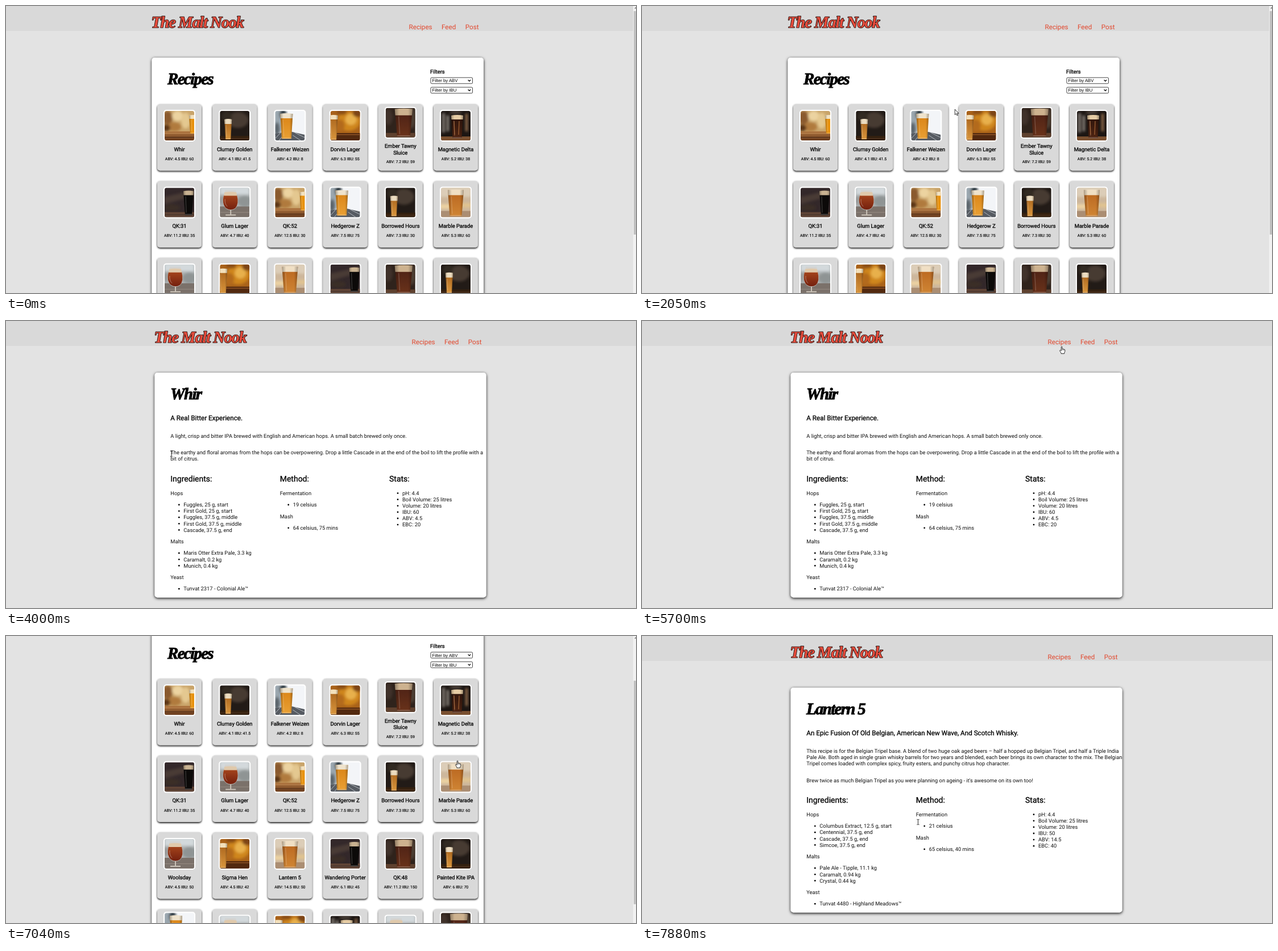
An HTML page for the animation above (8000 ms loop, 1108x506 px).

```html
<!DOCTYPE html>
<html lang="en">
<head>
<meta charset="utf-8">
<title>Recipes</title>
<style>
html, body { margin: 0; width: 100%; height: 100%; overflow: hidden; background: #e3e3e3; }
svg { display: block; width: 1108px; height: 506px; }
text { font-family: Roboto, sans-serif; font-size: 9.34px; fill: #111; text-rendering: geometricPrecision; white-space: pre; }
.script { font: italic bold 29px "Liberation Serif", serif; letter-spacing: -1.7px; fill: #000; stroke: #000; stroke-width: .9; }
.brand { font-size: 28.5px; letter-spacing: -1.3px; fill: #e74c3c; stroke: #1c1210; stroke-width: 1.7; paint-order: stroke; stroke-linejoin: round; }
.nav { font-size: 11.68px; fill: #e2492f; }
.strong { fill: #000; stroke: #000; stroke-width: .3; }
.tag { font-size: 11.68px; }
.head { font-size: 14px; }
.mid { text-anchor: middle; }
.abv { font-size: 7px; stroke-width: .15; }
.opt { font: 7.78px "Liberation Sans", sans-serif; fill: #000; }
</style>
</head>
<body>
<svg id="stage" viewBox="0 0 1108 506"></svg>
<script>
const stage = document.getElementById('stage');
const LOOP = 8000, LINE = 11.1;

const text = (x, y, s, cls = '') => `<text x="${x}" y="${y}" class="${cls}">${s}</text>`;
const rect = (x, y, w, h, fill, r = 0, more = '') =>
  `<rect x="${x}" y="${y}" width="${w}" height="${h}" rx="${r}" fill="${fill}" ${more}/>`;
const blob = (x, y, rx, ry, fill, o = 1) =>
  `<ellipse cx="${x}" cy="${y}" rx="${rx}" ry="${ry}" fill="${fill}" opacity="${o}"/>`;
const soft = s => `<g filter="url(#blur)">${s}</g>`;
const gradient = (id, a, b) =>
  `<linearGradient id="${id}" x2="0" y2="1"><stop stop-color="${a}"/><stop offset="1" stop-color="${b}"/></linearGradient>`;

// Tapered glass with a foam head, shaded sides and a highlight.
function glass(x, y, w, h, beer, foam, head, taper = 2.5) {
  const k = taper * head / h, r = x + w, b = y + h;
  const body = `<path d="M${x} ${y}H${r}L${r - taper} ${b}H${x + taper}Z" `;
  return body + `fill="${beer}"/>` +
    `<path d="M${x} ${y}Q${x + w / 2} ${y - 2} ${r} ${y}L${r - k} ${y + head}H${x + k}Z" fill="${foam}"/>` +
    body + 'fill="url(#sides)"/>' +
    `<path d="M${x + w * .22} ${y + head + 2}L${x + w * .28} ${b - 4}" stroke="#fff" stroke-width="1.2" opacity=".2"/>` +
    `<path d="M${x + taper} ${b - 1}H${r - taper}" stroke="#fff" stroke-width="1.5" opacity=".25"/>`;
}

const photos = {
  bar: rect(0, 0, 52, 52, '#c9a46a') +
    soft(blob(5, 12, 9, 12, '#8a5a2e') + blob(23, 9, 10, 9, '#ecd3a0') + blob(17, 28, 12, 8, '#b07a3e') +
      blob(37, 17, 8, 14, '#e4c890') + blob(3, 30, 7, 6, '#5c3619')) +
    rect(0, 36, 52, 16, 'url(#wood)') + rect(0, 39, 52, 1, '#c08a55') + rect(0, 46, 52, 1, '#4a2a16') +
    glass(43, 8, 16, 32, '#e8920f', '#f3e2c0', 6, 2),
  dim: rect(0, 0, 52, 52, '#221b17') +
    soft(blob(32, 16, 18, 14, '#463a32') + blob(12, 10, 9, 9, '#332a24')) +
    rect(0, 44, 52, 8, '#33200f') + rect(0, 48, 52, 1, '#553520') +
    glass(8, 15, 13, 35, 'url(#amber)', '#ecdcc0', 8, 2),
  light: rect(0, 0, 52, 52, '#f3f5f8') +
    soft(rect(-2, -2, 14, 40, '#9aa6ae') + blob(14, 6, 6, 9, '#333d45') + blob(3, 32, 5, 12, '#5a636a')) +
    '<path d="M0 40L26 36L52 42V52H0Z" fill="#565b62"/><path d="M-3 52L9 39M6 53L18 38M34 38L52 47M31 43L46 53" stroke="#b4b9be" stroke-width="1"/>' +
    glass(9, 5, 22, 44, 'url(#orange)', '#efe3cc', 8),
  gold: rect(0, 0, 52, 52, '#a9621a') +
    soft(blob(32, 18, 20, 17, '#cf861f') + blob(36, 15, 10, 10, '#e8b04c') + blob(17, 26, 8, 11, '#b36a1a') + blob(48, 4, 9, 7, '#7d4412') + blob(20, 2, 9, 5, '#8a4e14')) +
    rect(0, 39, 52, 13, '#52290f') + rect(0, 41, 52, 1.5, '#8f5527') +
    glass(-3, 8, 16, 43, 'url(#amber)', '#f3e0bb', 7, 2.5),
  brown: rect(0, 0, 52, 52, '#2f231c') +
    soft(blob(45, 18, 8, 18, '#4c3c32') + blob(5, 16, 7, 14, '#41322a')) +
    rect(0, 44, 52, 8, '#5e412f') +
    glass(16, 2, 31, 48, 'url(#ruby)', '#cdb28f', 11, 4),
  night: rect(0, 0, 52, 52, '#1c1613') +
    soft(rect(2, 4, 5, 34, '#7d766f') + rect(10, 8, 4, 28, '#8d8780') + rect(43, 5, 4, 31, '#96704d') + blob(26, 3, 11, 3, '#4d433b')) +
    rect(0, 45, 52, 7, '#7a5030') +
    glass(18, 8, 21, 40, 'url(#dark)', '#e6cca4', 7) +
    '<path d="M23 18L24 42M32 18L31 42" stroke="#b8743f" stroke-width="1.4" opacity=".7"/>',
  stout: rect(0, 0, 52, 52, '#33282a') +
    soft('<path d="M0 16L52 4V14L0 29Z" fill="#493b36"/>' + blob(13, 35, 14, 6, '#3a2d28')) +
    rect(0, 43, 52, 9, '#5f4436') + rect(0, 47, 52, 1, '#42302a') +
    glass(33, 6, 18, 42, '#0c0a09', '#c9b291', 7, 3),
  tulip: rect(0, 0, 52, 52, '#aeb3b4') +
    soft(rect(0, -2, 52, 14, '#d3d9dc') + blob(44, 24, 13, 10, '#8f9494') + blob(4, 22, 7, 8, '#9b9d9c')) +
    rect(0, 33, 52, 19, '#7b716a') + rect(0, 43, 52, 1, '#978c83') +
    '<path d="M9 4Q8 9 6 17Q3 30 11 37Q19 42 27 37Q34 30 31 17Q29 9 28 4Z" fill="#d5d2cc" opacity=".65"/>' +
    '<path d="M7 13H30Q34 29 27 36Q19 41 11 36Q3 29 7 13Z" fill="url(#red)"/>' +
    '<path d="M8 8Q18 6 29 8L30 14H7Z" fill="#e0c9ab"/>' +
    '<path d="M19 39V47M10 48H28" stroke="#cbc3b8" stroke-width="2"/><path d="M9 20Q8 28 13 33" fill="none" stroke="#fff" opacity=".35"/>',
  beige: rect(0, 0, 52, 52, '#cdb79c') +
    soft(rect(-2, -2, 56, 18, '#dccdb8') + rect(-2, 29, 20, 8, '#ecd2a2') + rect(36, 27, 18, 8, '#dfc391')) +
    rect(0, 41, 52, 11, '#ab8e73') +
    glass(12, 4, 28, 46, 'url(#copper)', '#f0dfc4', 9, 3.5)
};

// photo, name, ABV, IBU
const beers = [
  ['bar', 'Whir', 4.5, 60], ['dim', 'Clumsy Golden', 4.1, 41.5], ['light', 'Falkener Weizen', 4.2, 8],
  ['gold', 'Dorvin Lager', 6.3, 55], ['brown', 'Ember Tawny|Sluice', 7.2, 59], ['night', 'Magnetic Delta', 5.2, 38],
  ['stout', 'QK:31', 11.2, 35], ['tulip', 'Glum Lager', 4.7, 40], ['bar', 'QK:52', 12.5, 30],
  ['light', 'Hedgerow Z', 7.5, 75], ['dim', 'Borrowed Hours', 7.3, 30], ['beige', 'Marble Parade', 5.3, 60],
  ['tulip', 'Woolsday', 4.5, 50], ['gold', 'Sigma Hen', 4.5, 42], ['beige', 'Lantern 5', 14.5, 50],
  ['stout', 'Wandering Porter', 6.1, 45], ['brown', 'QK:48', 11.2, 150], ['dim', 'Painted Kite IPA', 6, 70],
  ['light', 'Quiet Meadow|Weizen', 4.8, 20], ['tulip', 'Copper Gate', 5.6, 45], ['gold', 'Amber Row', 5, 35],
  ['night', 'Tin Harbour', 6.8, 50], ['tulip', 'Slow Ferry', 5.4, 40], ['brown', 'Velvet Barrow|Brown', 7, 55]
];

const CARD = { x: 266, y: 173, dx: 97.2, dy: 135.4, w: 78, h: 117.3 };

function card([photo, name, abv, ibu], i) {
  const names = name.split('|'), up = names.length > 1 ? 5.2 : 0;
  const label = names.map((s, n) => text(39, 82.6 - up + n * LINE, s, 'strong mid')).join('');
  return `<g transform="translate(${CARD.x + i % 6 * CARD.dx} ${CARD.y + Math.floor(i / 6) * CARD.dy})">` +
    rect(0, 0, CARD.w, CARD.h, '#d9d9d9', 5, 'filter="url(#low)"') +
    rect(11, 10 - up, 56, 56, '#fff', 5) +
    `<g transform="translate(13 ${12 - up})"><g clip-path="url(#round)">${photos[photo]}</g></g>` + label +
    text(39, 99 + (up ? 5.3 : 0), `ABV: ${abv} IBU: ${ibu}`, 'strong abv mid') + '</g>';
}

const header = x => rect(0, 0, 1108, 44, '#d9d9d9') +
  text(x, 37.8, 'The Malt Nook', 'script brand') +
  text(x + 453, 41.3, 'Recipes', 'nav') + text(x + 510.5, 41.3, 'Feed', 'nav') + text(x + 552.3, 41.3, 'Post', 'nav');

const select = (y, s) => rect(747, y, 73.5, 10.6, '#fff', 1.8, 'stroke="#333" stroke-width=".9"') +
  text(749.6, y + 8.1, s, 'opt') +
  `<path d="M812.6 ${y + 4}l2.3 2.3l2.3 -2.3" fill="none" stroke="#111" stroke-width="1.3"/>`;

const listPage = header(255.5) + rect(256.5, 91, 583.5, 900, '#fff', 5, 'filter="url(#deep)"') +
  text(284, 138, 'Recipes', 'script') + text(746, 118.7, 'Filters', 'strong') +
  select(126.2, 'Filter by ABV') + select(143.2, 'Filter by IBU') + beers.map(card).join('');

// Bulleted list; returns the markup and the baseline of its last line.
function bullets(x, y, items) {
  const svg = items.map((s, i) => `<circle cx="${x + 15}" cy="${y + i * LINE - 3.2}" r="1.4"/>` +
    text(x + 23, y + i * LINE, s)).join('');
  return [svg, y + (items.length - 1) * LINE];
}

function column(x, y, title, groups) {
  let out = text(x, y, title, 'head strong');
  y += 23.7;
  for (const [label, ...items] of groups) {
    if (label) { out += text(x, y, label); y += 20.4; }
    const [svg, last] = bullets(x, y, items);
    out += svg;
    y = last + 20.4;
  }
  return out;
}

function detailPage({ name, tag, paras, hops, malts, yeast, ferment, mash, stats }) {
  const keys = ['pH', 'Boil Volume', 'Volume', 'IBU', 'ABV', 'EBC'];
  let y = 205.6, body = '';
  for (const lines of paras) {
    lines.forEach((s, i) => body += text(289.3, y + i * LINE, s));
    y += (lines.length - 1) * LINE + 29.7;
  }
  y += 7;
  return header(260.5) + rect(261.5, 91, 583, 396.5, '#fff', 5, 'filter="url(#deep)"') +
    text(289, 138, name, 'script') + text(289.3, 174.5, tag, 'strong tag') + body +
    column(289.3, y, 'Ingredients:', [['Hops', ...hops], ['Malts', ...malts], ['Yeast', yeast]]) +
    column(481.7, y, 'Method:', [['Fermentation', ferment], ['Mash', mash]]) +
    column(674, y, 'Stats:', [['', ...keys.map((k, i) => `${k}: ${stats[i]}`)]]);
}

const first = detailPage({
  name: 'Whir', tag: 'A Real Bitter Experience.',
  paras: [
    ['A light, crisp and bitter IPA brewed with English and American hops. A small batch brewed only once.'],
    ['The earthy and floral aromas from the hops can be overpowering. Drop a little Cascade in at the end of the boil to lift the profile with a',
      'bit of citrus.']],
  hops: ['Fuggles, 25 g, start', 'First Gold, 25 g, start', 'Fuggles, 37.5 g, middle', 'First Gold, 37.5 g, middle', 'Cascade, 37.5 g, end'],
  malts: ['Maris Otter Extra Pale, 3.3 kg', 'Caramalt, 0.2 kg', 'Munich, 0.4 kg'],
  yeast: 'Tunvat 2317 - Colonial Ale™', ferment: '19 celsius', mash: '64 celsius, 75 mins',
  stats: [4.4, '25 litres', '20 litres', 60, 4.5, 20]
});

const second = detailPage({
  name: 'Lantern 5', tag: 'An Epic Fusion Of Old Belgian, American New Wave, And Scotch Whisky.',
  paras: [
    ['This recipe is for the Belgian Tripel base. A blend of two huge oak aged beers – half a hopped up Belgian Tripel, and half a Triple India',
      'Pale Ale. Both aged in single grain whisky barrels for two years and blended, each beer brings its own character to the mix. The Belgian',
      'Tripel comes loaded with complex spicy, fruity esters, and punchy citrus hop character.'],
    ["Brew twice as much Belgian Tripel as you were planning on ageing - it's awesome on its own too!"]],
  hops: ['Columbus Extract, 12.5 g, start', 'Centennial, 37.5 g, end', 'Cascade, 37.5 g, end', 'Simcoe, 37.5 g, end'],
  malts: ['Pale Ale - Tipple, 11.1 kg', 'Caramalt, 0.94 kg', 'Crystal, 0.44 kg'],
  yeast: 'Tunvat 4480 - Highland Meadows™', ferment: '21 celsius', mash: '65 celsius, 40 mins',
  stats: [4.4, '25 litres', '20 litres', 50, 14.5, 40]
});

const pointers = {
  arrow: '<path d="M0 0V9.6L2.2 7.6L3.8 11L5.3 10.3L3.8 7.1H6.8Z" fill="#fff" stroke="#000" stroke-width=".8"/>',
  hand: '<path d="M-.9 .6Q0 -.7 .9 .6V4.4Q2 3.5 2.7 4.7Q3.8 4 4.3 5.2Q5.6 4.8 5.7 6.3V8.6L4.6 11V12.6H-1.1V11.3L-3.6 7.4Q-3.4 5.8 -1.9 6.7L-.9 7.6Z" fill="#fff" stroke="#111" stroke-width=".85"/><path d="M.9 4.4V7M2.7 4.7V7M4.3 5.2V7" stroke="#111" stroke-width=".5"/>',
  beam: '<path d="M-2 -4.6H-.6L0 -4L.6 -4.6H2M0 -4V4M-2 4.6H-.6L0 4L.6 4.6H2" fill="none" stroke="#111" stroke-width=".9"/>'
};

const group = (id, s) => `<g id="${id}">${s}</g>`;
stage.innerHTML = `<defs>
  <filter id="deep" x="-5%" y="-5%" width="110%" height="110%"><feDropShadow dx="0" dy="1.5" stdDeviation="2.9" flood-opacity="1"/></filter>
  <filter id="low" x="-10%" y="-10%" width="120%" height="120%"><feDropShadow dx="0" dy="1.6" stdDeviation="1.4" flood-opacity="1"/></filter>
  <filter id="blur"><feGaussianBlur stdDeviation="2"/></filter>
  <clipPath id="round"><rect width="52" height="52" rx="3.5"/></clipPath>
  <linearGradient id="sides"><stop stop-opacity=".3"/><stop offset=".25" stop-opacity="0"/><stop offset=".75" stop-opacity="0"/><stop offset="1" stop-opacity=".3"/></linearGradient>
  ${gradient('wood', '#b07640', '#66391c')}${gradient('amber', '#a9631c', '#d8953c')}${gradient('orange', '#d98214', '#e9a034')}
  ${gradient('ruby', '#4a2015', '#69321a')}${gradient('dark', '#2c140c', '#4f2412')}
  ${gradient('red', '#a4441c', '#74200e')}${gradient('copper', '#b9651f', '#cf8534')}</defs>` +
  rect(0, 0, 1108, 506, '#e3e3e3') + group('list', listPage) + group('first', first) + group('second', second) +
  group('bar', rect(1103, 0, 5, 506, '#f1f1f1') + '<path d="M1105 4.5L1108 1.5V4.5Z" fill="#777"/>' +
    rect(1104, 9, 4, 394, '#c1c1c1', 0, 'id="thumb"')) +
  group('pointer', Object.keys(pointers).map(k => group(k, pointers[k])).join(''));

const el = id => document.getElementById(id);
const show = (id, on) => el(id).setAttribute('display', on ? 'inline' : 'none');
const move = (id, x, y) => el(id).setAttribute('transform', `translate(${x} ${y})`);

// Pointer path: time, x, y. Repeated places are rests.
const path = [
  [30, 1074, 471], [190, 941, 231], [450, 941, 231], [880, 876, 109], [1090, 876, 109], [1260, 882, 114],
  [1470, 882, 114], [2050, 551, 182], [2260, 320, 231], [2300, 320, 231], [2440, 291, 234], [4490, 291, 234],
  [4880, 414, 86], [5260, 317, 194], [5300, 317, 194], [5560, 640, 42], [5700, 738, 45], [6080, 735, 38],
  [6530, 735, 38], [6750, 804, 221], [6930, 804, 221], [7040, 794, 220], [7100, 794, 220], [7640, 485.5, 328], [8000, 485.5, 328]
];

function slope(i, c) {
  const a = path[i - 1], p = path[i], b = path[i + 1];
  const rest = q => !q || (q[1] === p[1] && q[2] === p[2]);
  return rest(a) || rest(b) ? 0 : (b[c] - a[c]) / (b[0] - a[0]);
}

function pointerAt(t) {
  let i = 0;
  while (i < path.length - 2 && path[i + 1][0] <= t) i++;
  const p = path[i], q = path[i + 1], d = q[0] - p[0], u = Math.min(1, Math.max(0, (t - p[0]) / d));
  return [1, 2].map(c => p[c] * (1 + 2 * u) * (1 - u) ** 2 + q[c] * u * u * (3 - 2 * u) +
    d * u * (1 - u) * (slope(i, c) * (1 - u) - slope(i + 1, c) * u));
}

function scrollAt(t) {
  const u = Math.min(1, Math.max(0, (t - 6890) / 280));
  return 175 * u * u * (3 - 2 * u);
}

function pointerKind(page, x, y, scroll) {
  if (y > 30 && y < 46 && x > 708 && x < 838 && !scroll) return 'hand';
  if (page === 'list') {
    const cx = x - CARD.x, cy = y + scroll - CARD.y;
    const inside = cx >= 0 && cy >= 0 && cx < 6 * CARD.dx && cx % CARD.dx < CARD.w && cy % CARD.dy < CARD.h;
    return inside ? 'hand' : 'arrow';
  }
  const inText = x > 287 && x < 840 && ((y > 112 && y < 144) || (y > 164 && y < 177) || (y > 196 && y < 208) || y > 226);
  return inText ? 'beam' : 'arrow';
}

function draw(t) {
  const page = t >= 7800 ? 'second' : t >= 2960 && t < 6110 ? 'first' : 'list';
  const scroll = scrollAt(t), [x, y] = pointerAt(t), kind = pointerKind(page, x, y, scroll);
  for (const id of ['list', 'first', 'second']) show(id, id === page);
  show('bar', page === 'list');
  move('list', 0, -scroll);
  move('thumb', 0, scroll * .714);
  show('pointer', t >= 30);
  for (const id in pointers) show(id, id === kind);
  move('pointer', x, y);
}

const start = performance.now();
function tick() {
  draw((performance.now() - start) % LOOP);
  requestAnimationFrame(tick);
}
tick();
</script>
</body>
</html>
```
